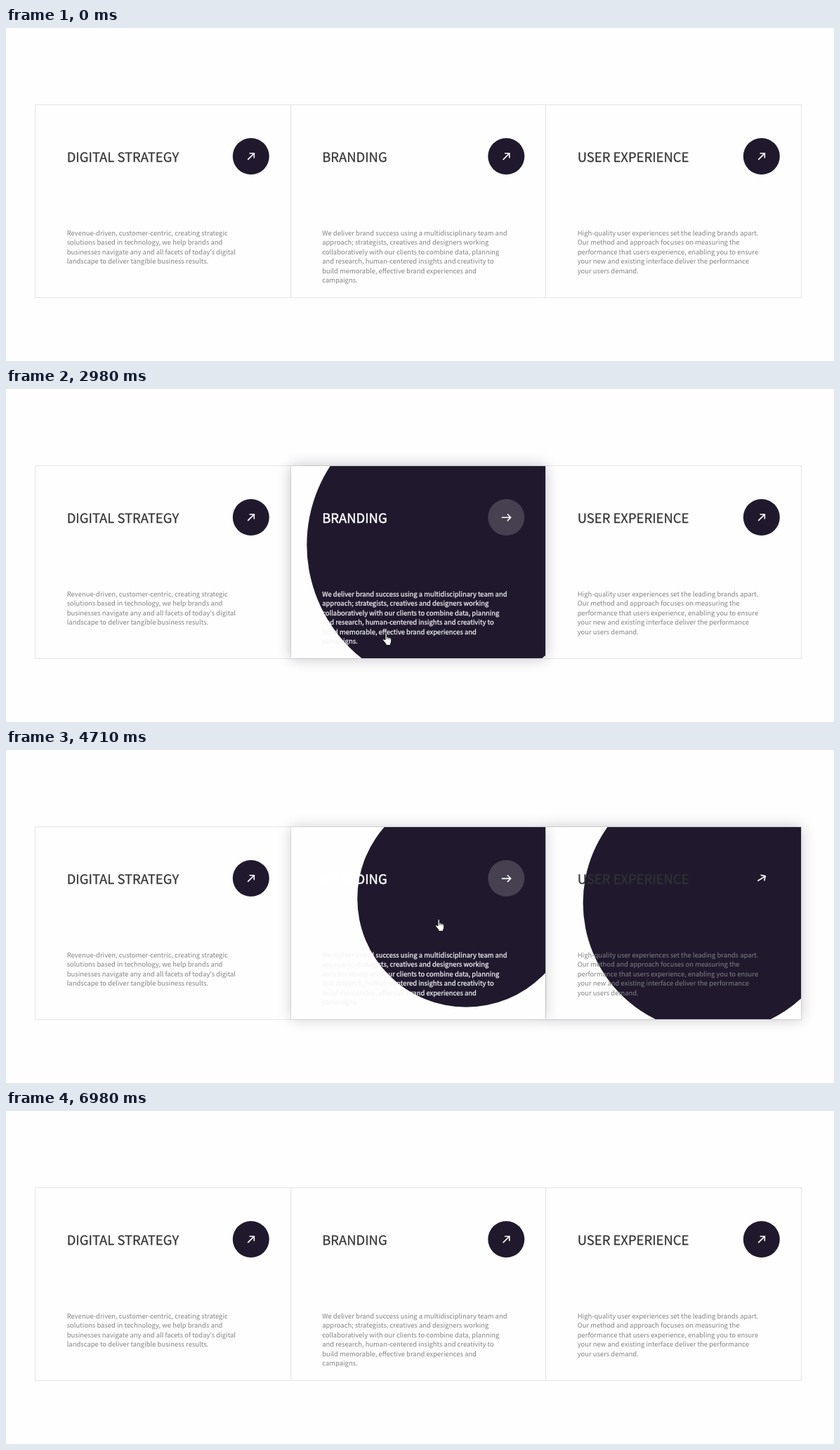
Animation of 1179 by 475 pixels, one loop 7.72 s. Source, as an HTML page:

```html
<!DOCTYPE html>
<html lang="en">
<head>
<meta charset="utf-8">
<title>Service cards</title>
<style>
  html, body { margin: 0; width: 100%; height: 100%; overflow: hidden; background: #fefefe; }
  #stage { display: block; width: 100vw; height: 100vh; }
  text {
    font-family: "Noto Sans CJK JP", "Noto Sans CJK SC", "Noto Sans", sans-serif;
    text-rendering: geometricPrecision;
    white-space: pre;
  }
  .title { font-size: 18.45px; font-weight: 500; fill: #333; stroke: #333; stroke-width: .25px; }
  .body { font-size: 9.45px; fill: #828282; }
  .button { fill: #20192e; }
  .on .title { fill: #fff; stroke: #fff; stroke-width: .5px; }
  .on .body { fill: #f4f4f4; stroke: #f4f4f4; stroke-width: .25px; }
  .on .button { fill: #fff; fill-opacity: .17; }
</style>
</head>
<body>
<svg id="stage" viewBox="0 0 1179 475">
  <filter id="blur" x="-20%" y="-20%" width="140%" height="140%">
    <feGaussianBlur stdDeviation="10"/>
  </filter>
  <rect width="1179" height="475" fill="#fefefe"/>
  <g id="grid" fill="none" stroke="#e4e4e4"></g>
  <g id="cards"></g>
  <g id="cursor" fill="#fff" stroke="#111" stroke-linejoin="round">
    <path id="pointer" d="M.5 .8V12.2L3.2 9.7L5 13.8L6.9 13L5.2 9H8.8Z" stroke-width=".9"/>
    <g id="hand" transform="translate(-4 0)">
      <path d="M4 10V1.8Q4 .5 5.1 .5T6.3 1.8V6Q8.4 5 8.7 6.7Q10.6 5.8 10.9 7.3Q12.7 6.8 12.7 8.6V12Q12.7 14 11.4 15.4V17.5H5V15.7L1 10.8Q.2 9.4 1.2 8.9Q2.2 8.4 4 10Z"/>
      <path d="M6.3 6V9M8.7 6.7V9.2M10.9 7.3V9.4" stroke-width=".7" fill="none"/>
    </g>
  </g>
</svg>
<script>
const LOOP = 7720, GROW = 600, TURN = 200;
const LEFT = 41.5, TOP = 109.5, CARD_W = 363.5, CARD_H = 275;
const RADIUS = 340, DARK = "#20192e";
const $ = id => document.getElementById(id);

const cards = [
  { title: "DIGITAL STRATEGY", lines: [
    "Revenue-driven, customer-centric, creating strategic",
    "solutions based in technology, we help brands and",
    "businesses navigate any and all facets of today's digital",
    "landscape to deliver tangible business results."] },
  { title: "BRANDING", lines: [
    "We deliver brand success using a multidisciplinary team and",
    "approach; strategists, creatives and designers working",
    "collaboratively with our clients to combine data, planning",
    "and research, human-centered insights and creativity to",
    "build memorable, effective brand experiences and",
    "campaigns."] },
  { title: "USER EXPERIENCE", lines: [
    "High-quality user experiences set the leading brands apart.",
    "Our method and approach focuses on measuring the",
    "performance that users experience, enabling you to ensure",
    "your new and existing interface deliver the performance",
    "your users demand."] }
];

const visits = [
  { card: 0, enter: 1088, leave: 2178 },
  { card: 1, enter: 2770, leave: 3597 },
  { card: 2, enter: 3597, leave: 4548 },
  { card: 1, enter: 4548, leave: 5200 },
  { card: 0, enter: 5200, leave: 5939 }
];

// Cursor stops: time, x, y
const stops = [
  [790, 262, 474], [1310, 281, 320], [1510, 281, 320], [1770, 290, 302],
  [1980, 290, 302], [2490, 405, 456], [2770, 440, 384], [3720, 888, 222],
  [4050, 960, 226], [4330, 960, 226], [4710, 615, 241], [5700, 342, 310],
  [6100, 427, 473], [6350, 1000, 640], [6760, 1096, 416], [6980, 1165, 490]
];

function bezier(x1, y1, x2, y2) {
  const at = (a, b, u) => 3 * a * u * (1 - u) ** 2 + 3 * b * u * u * (1 - u) + u ** 3;
  return x => {
    if (x <= 0) return 0;
    if (x >= 1) return 1;
    let lo = 0, hi = 1;
    for (let i = 0; i < 24; i++) {
      const mid = (lo + hi) / 2;
      if (at(x1, x2, mid) < x) lo = mid; else hi = mid;
    }
    return at(y1, y2, lo);
  };
}
const ease = bezier(.25, .1, .25, 1);
const easeIn = bezier(.42, 0, 1, 1);

function set(el, attrs) {
  for (const k in attrs) el.setAttribute(k, attrs[k]);
  return el;
}
function add(parent, tag, attrs, text = "") {
  const el = set(document.createElementNS("http://www.w3.org/2000/svg", tag), attrs);
  el.textContent = text;
  return parent.appendChild(el);
}

// Card borders sit on whole pixels, the content does not.
const edge = i => LEFT + Math.round(i * CARD_W);

function build(card, i) {
  const left = LEFT + i * CARD_W, width = edge(i + 1) - edge(i);
  add($("grid"), "rect", { x: edge(i), y: TOP, width, height: CARD_H });

  const g = card.el = add($("cards"), "g", { transform: `translate(${left} ${TOP})` });
  const x = edge(i) + .5 - left;
  const box = { x, y: .5, width: width - 1, height: CARD_H - 1 };
  card.shadow = add(g, "rect", { ...box, fill: DARK, filter: "url(#blur)" });
  add(g, "rect", { ...box, fill: "#fefefe" });
  const clip = add(g, "svg", { ...box, overflow: "hidden" });
  card.disc = add(add(clip, "g", { transform: `translate(${-x} -.5)` }), "circle", { fill: DARK });
  add(g, "circle", { class: "button", cx: 307.3, cy: 73.5, r: 26 });
  card.arrow = add(g, "path", {
    d: "M-6.5 0H6.3M1.6 -4.8L6.4 0L1.6 4.8", fill: "none", stroke: "#fff", "stroke-width": 1.6
  });
  add(g, "text", { class: "title", x: 45.2, y: 81.8 }, card.title);
  card.lines.forEach((line, n) =>
    add(g, "text", { class: "body", x: 45.2, y: 186.2 + n * 13.55 }, line));
}

function hover(i, t) {
  const visit = visits.filter(v => v.card === i && v.enter <= t).pop();
  if (!visit) return { on: false, grow: 0, turn: 0 };
  const since = t - visit.enter, gone = t - visit.leave;
  return gone < 0
    ? { on: true, grow: ease(since / GROW), turn: ease(since / TURN) }
    : { on: false, grow: 1 - ease(gone / GROW), turn: 1 - easeIn(gone / TURN) };
}

function drawCard(card, i, t) {
  const { on, grow, turn } = hover(i, t), r = RADIUS * grow;
  set(card.el, { class: on ? "on" : "" });
  set(card.shadow, { opacity: .46 * grow });
  set(card.disc, { r, cx: 310.5 - .39 * r, cy: 71.5 + .2 * r });
  set(card.arrow, { transform: `translate(307.3 73.8) rotate(${45 * turn - 45})` });
  return on;
}

function drawCursor(t, hand) {
  const i = stops.findIndex(s => s[0] > t);
  $("cursor").style.display = i > 0 ? "" : "none";
  if (i < 1) return;
  const a = stops[i - 1], b = stops[i], u = (t - a[0]) / (b[0] - a[0]);
  const [, x, y] = a.map((v, k) => Math.round(v + (b[k] - v) * u));
  set($("cursor"), { transform: `translate(${x} ${y})` });
  $("hand").style.display = hand ? "" : "none";
  $("pointer").style.display = hand ? "none" : "";
}

function draw(t) {
  const active = cards.filter((card, i) => drawCard(card, i, t))[0];
  // The hovered card lies above its neighbours.
  const order = cards.filter(c => c !== active).concat(active || []);
  $("cards").append(...order.map(c => c.el));
  drawCursor(t, !!active);
}

cards.forEach(build);
const start = performance.now();
function tick() {
  draw((performance.now() - start) % LOOP);
  requestAnimationFrame(tick);
}
tick();
</script>
</body>
</html>
```
